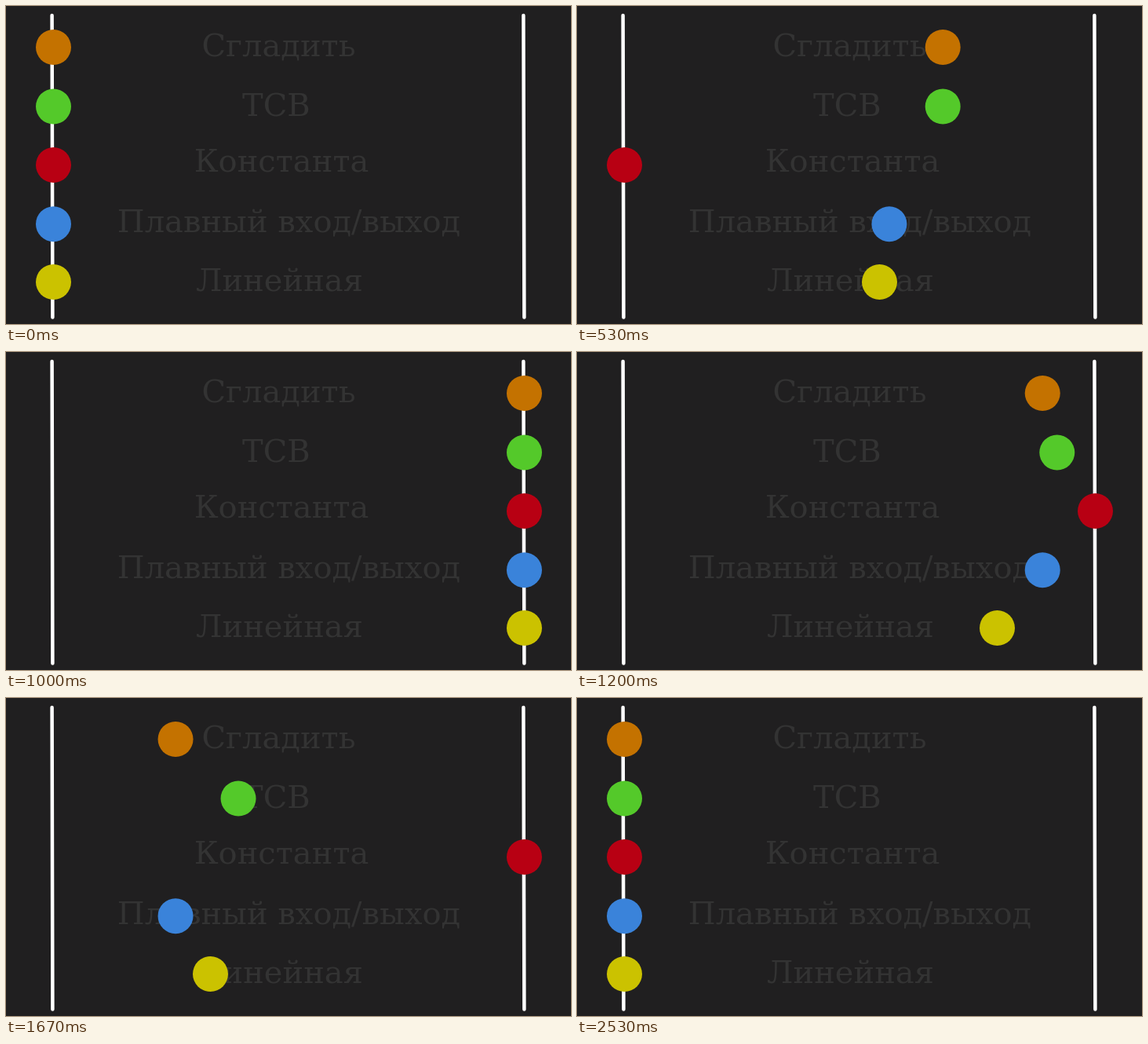
Recreate the animation shown at these times as an HTML page. Size 720x405 px, loop 5070 ms.

```html
<!DOCTYPE html>
<html lang="ru">
<head>
<meta charset="utf-8">
<title>Интерполяция</title>
<style>
  html, body { margin: 0; width: 100%; height: 100%; overflow: hidden; background: #201f20; }
  svg { display: block; width: 100vw; height: 100vh; }
  text { font: 40px "DejaVu Serif", serif; text-anchor: middle; fill: #333; }
  line { stroke: #fff; stroke-width: 4.5; stroke-linecap: round; }
</style>
</head>
<body>
<svg viewBox="0 0 720 405">
  <line x1="58.6" y1="12" x2="59.4" y2="396.5"/>
  <line x1="659.4" y1="12" x2="660.4" y2="396.5"/>
  <text x="347.5" y="63.5">Сгладить</text>
  <text x="344.3" y="140">ТСВ</text>
  <text x="351" y="211.3">Константа</text>
  <text x="360.5" y="288.3">Плавный вход/выход</text>
  <text x="348.5" y="363.3">Линейная</text>
  <g id="balls">
    <circle r="22.5" cy="52.5" fill="#c47200"/>
    <circle r="22.5" cy="128" fill="#54c92a"/>
    <circle r="22.5" cy="202.5" fill="#b80013"/>
    <circle r="22.5" cy="277.7" fill="#3a83da"/>
    <circle r="22.5" cy="351.5" fill="#cbc200"/>
  </g>
</svg>
<script>
  const LOOP = 5070, LEFT = 60.5, SPAN = 600;
  const LEG = 24, SETTLE = 12;  // ticks, 24 per second
  const LAST_STEP = 38;
  const balls = document.querySelectorAll('#balls circle');

  // Hermite curve from a to b with end tangents m and n
  const hermite = (u, a, b, m = 0, n = 0) =>
    a + (b - a) * u * u * (3 - 2 * u) + m * u * (1 - u) ** 2 - n * u * u * (1 - u);

  // There, back, then settle; each part gets its progress 0..1
  const path = (there, back, settle = () => 0) => k =>
    k < LEG ? there(k / LEG) :
    k < 2 * LEG ? back(k / LEG - 1) :
    k < 2 * LEG + SETTLE ? settle((k - 2 * LEG) / SETTLE) : 0;

  const launch = u => hermite(u, 0, 1, 1);
  const easeBack = u => hermite(u, 1, 0);

  const paths = [
    path(launch, easeBack),
    path(launch, u => hermite(u, 1, 0, 0, -0.9), u => hermite(u, 0, 0, -0.235)),
    path(() => 0, () => 1),
    path(u => hermite(u, 0, 1), easeBack),
    path(u => u, u => 1 - u)
  ];

  // The picture steps 15 times a second on a 10 ms clock
  function tickAt(ms) {
    const clock = Math.floor(ms / 10) * 10;
    const step = Math.min(LAST_STEP, Math.floor((clock + 5) * 0.015));
    return Math.floor(step * 1.6 + 0.7);
  }

  function draw(now) {
    const tick = tickAt(now % LOOP);
    balls.forEach((ball, i) => ball.setAttribute('cx', LEFT + SPAN * paths[i](tick)));
  }

  const start = performance.now();
  function loop() {
    draw(performance.now() - start);
    requestAnimationFrame(loop);
  }
  loop();
</script>
</body>
</html>
```
